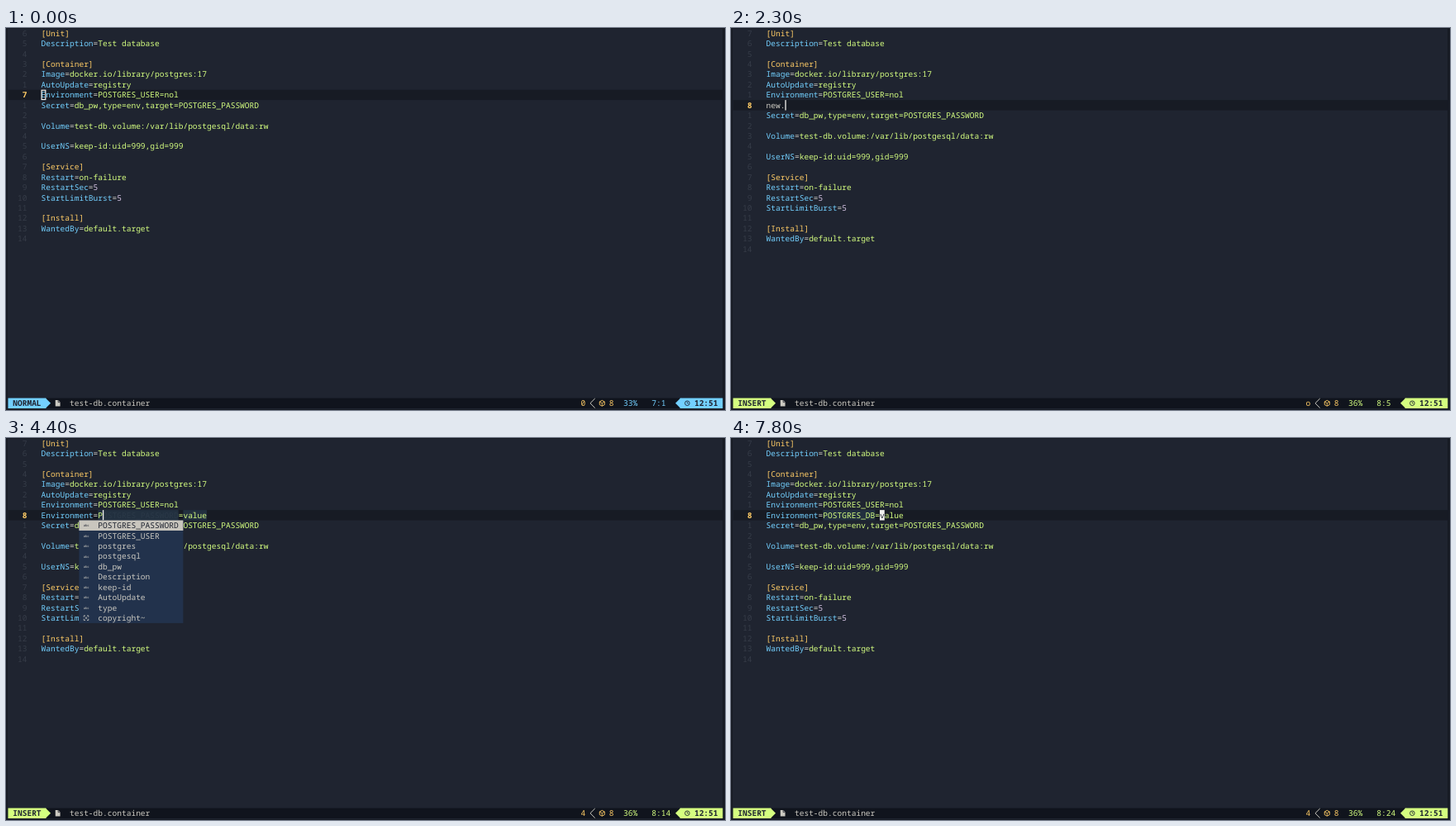
These frames come from a looping animation (870 by 462 pixels, 8 s). An HTML page with a canvas:

```html
<!DOCTYPE html>
<html lang="en">
<head>
<meta charset="utf-8">
<title>Editor session</title>
<style>
html, body { margin: 0; width: 100%; height: 100%; overflow: hidden; background: #1f2430; }
canvas { display: block; }
</style>
</head>
<body>
<canvas id="stage" width="870" height="462"></canvas>
<script>
const ctx = document.getElementById('stage').getContext('2d');
ctx.textRendering = 'geometricPrecision';
const LOOP = 8000, CELL = 5.727, LINE = 12.43, LEFT = 2.5, TOP = 0.1, BASE = 9.6, COLS = 151;
const TEXT_COL = 7, EDIT_ROW = 7, STATUS_ROW = 36;
const FONT = '9.545px "Noto Sans Mono", "DejaVu Sans Mono", monospace';
const C = {
  bg: '#1f2430', edge: '#171b24', line: '#171b24', bar: '#10141d', fg: '#cccac2',
  dim: '#363c48', yellow: '#ffcc66', blue: '#73d0ff', green: '#d5ff80', num: '#d6c4e4',
  orange: '#ffad66', menu: '#22324c', pick: '#c9c6be', thumb: '#586270', slot: '#22303f',
  slotGhost: '#2b3948', select: '#33486a', cursor: '#f2f2f0'
};
const MODES = { NORMAL: C.blue, INSERT: C.green, SELECT: C.orange };

const FILE = `[Unit]
Description=Test database

[Container]
Image=docker.io/library/postgres:17
AutoUpdate=registry
Environment=POSTGRES_USER=nol
Secret=db_pw,type=env,target=POSTGRES_PASSWORD

Volume=test-db.volume:/var/lib/postgesql/data:rw

UserNS=keep-id:uid=999,gid=999

[Service]
Restart=on-failure
RestartSec=5
StartLimitBurst=5

[Install]
WantedBy=default.target
`.split('\n');

// Completion menus: first column, width in cells, entries
const menu = (col, width, list, scroll) => ({ col, width, items: list.split(' '), scroll });
const wordMenu = list => menu(15, 22, list);
const OPTIONS = menu(3, 28, 'Network= NetworkAlias= NoNewPrivileges= Notify= Environment= UserNS= ' +
  'Annotation= ContainerName= ContainersConfModule= DNSOption=', true);
const OPTIONS_NE = menu(3, 22, 'Network= NetworkAlias= NoNewPrivileges= Environment= ContainerName=');
const OPTIONS_NEW = menu(3, 22, 'NoNewPrivileges=');
const SNIPPETS = menu(7, 21, 'new.Environment~ new.Volume~ dateDMY~ dateMDY~ timeHMS~ datetime~');
const WORDS = wordMenu('POSTGRES_PASSWORD POSTGRES_USER postgres postgesql db_pw Description ' +
  'keep-id AutoUpdate type copyright~');
const WORDS_PO = wordMenu('POSTGRES_PASSWORD POSTGRES_USER postgres postgesql');
const WORDS_ENV = wordMenu('POSTGRES_PASSWORD POSTGRES_USER');
const WORD_LAST = wordMenu('POSTGRES_PASSWORD');

// Each step overrides part of the state before it
const STEPS = [
  [0, { mode: 'NORMAL', key: '0', pct: '33%', pos: '7:1', open: false, cursor: 'box' }],
  [100, { cursor: 'block' }],
  [1300, { open: true, cursor: 'bar', typed: '', ghost: '' }],
  [1900, { mode: 'INSERT', key: 'o', pct: '36%', pos: '8:2', typed: 'n', ghost: 'etwork=', menu: OPTIONS }],
  [2000, { typed: 'ne', ghost: 'twork=', pos: '8:3', menu: OPTIONS_NE }],
  [2200, { typed: 'new', ghost: '', pos: '8:4', menu: OPTIONS_NEW }],
  [2300, { typed: 'new.', pos: '8:5', menu: null }],
  [2700, { typed: 'new.E', ghost: 'onment=name=value', pos: '8:6', menu: SNIPPETS }],
  [2900, { typed: 'new.En', ghost: 'nment=name=value' }],
  [3700, { snippet: true, typed: '', ghost: '', name: 'name', menu: null, cursor: 'block' }],
  [3800, { mode: 'SELECT', key: '4', pos: '8:13' }],
  [4200, { name: '', typed: 'P', cursor: 'bar' }],
  [4300, { mode: 'INSERT', pos: '8:14', menu: WORDS }],
  [4500, { typed: 'PO', pos: '8:15', menu: WORDS_PO }],
  [4600, { typed: 'POS', pos: '8:16' }],
  [4700, { typed: 'POST', pos: '8:17' }],
  [4800, { typed: 'POSTG', pos: '8:18' }],
  [5900, { typed: 'POSTGR' }],
  [6000, { typed: 'POSTGRE', pos: '8:19' }],
  [6100, { typed: 'POSTGRES', pos: '8:20' }],
  [6300, { typed: 'POSTGRES_', pos: '8:21', menu: WORDS_ENV }],
  [6400, { typed: 'POSTGRES_D', pos: '8:22', menu: WORD_LAST }],
  [6500, { typed: 'POSTGRES_DB', pos: '8:23', menu: null }],
  [7800, { pos: '8:24', jumped: true, cursor: 'block' }]
];

const x = col => LEFT + col * CELL;
const y = row => TOP + row * LINE;

function cells(col, row, width, color, rows = 1) {
  ctx.fillStyle = color;
  ctx.fillRect(x(col), y(row), width * CELL, rows * LINE);
}

function text(str, col, row, color, bold) {
  ctx.font = (bold ? 'bold ' : '') + FONT;
  ctx.fillStyle = color;
  [...str].forEach((ch, i) => ctx.fillText(ch, x(col + i), y(row) + BASE));
  return col + str.length;
}

function path(points, color, stroke) {
  ctx.beginPath();
  points.forEach(([px, py]) => ctx.lineTo(px, py));
  if (stroke) {
    ctx.strokeStyle = color;
    ctx.lineWidth = stroke;
    ctx.stroke();
  } else {
    ctx.fillStyle = color;
    ctx.fill();
  }
}

function codeLine(str, row) {
  if (str[0] === '[') return text(str, TEXT_COL, row, C.yellow);
  const cut = str.indexOf('=');
  if (cut < 0) return;
  const value = str.slice(cut + 1);
  let col = text(str.slice(0, cut), TEXT_COL, row, C.blue);
  col = text('=', col, row, C.fg);
  text(value, col, row, /^\d+$/.test(value) ? C.num : C.green);
}

function cursor(kind, col, row, ch) {
  if (kind === 'bar') {
    ctx.fillStyle = C.cursor;
    ctx.fillRect(x(col) - 0.1, y(row), 1.3, LINE);
  } else if (kind === 'box') {
    ctx.strokeStyle = C.cursor;
    ctx.lineWidth = 1.2;
    ctx.strokeRect(x(col) + 0.5, y(row) + 0.6, CELL - 1, LINE - 1.2);
  } else {
    cells(col, row, 1, C.cursor);
    text(ch, col, row, C.bg);
  }
}

function editLine(s) {
  const row = EDIT_ROW;
  if (!s.snippet) {
    const end = text(s.typed, TEXT_COL, row, C.fg);
    text(s.ghost, end, row, C.dim);
    return cursor(s.cursor, end, row, '');
  }
  const start = text('=', text('Environment', TEXT_COL, row, C.blue), row, C.fg);
  const word = s.name || s.typed;
  const full = 'POSTGRES_PASSWORD';
  const ghost = s.menu && full.startsWith(s.typed) ? full.slice(s.typed.length) : '';
  const end = start + word.length + ghost.length;
  cells(start, row, end - start, s.name ? C.select : C.slot);
  if (!s.jumped) cells(end + 1, row, 5, C.slot);
  text(ghost, text(word, start, row, C.green), row, C.slotGhost);
  text('=value', end, row, C.green);
  if (s.jumped) cursor('block', end + 1, row, 'v');
  else if (s.name) cursor('block', start, row, 'n');
  else cursor('bar', start + word.length, row);
}

function itemIcon(label, cx, cy, color) {
  const at = pts => pts.map(([a, b]) => [cx + a, cy + b]);
  if (label.endsWith('=')) {
    path(at([[-2.8, -2.6], [0, -2.6], [2.8, 0.2], [0.3, 2.7], [-2.8, -0.3]]), color);
  } else if (label.endsWith('~')) {
    for (const sx of [-1, 1]) for (const sy of [-1, 1])
      path(at([[sx * 2.8, sy], [sx * 2.8, sy * 2.8], [sx, sy * 2.8]]), color, 0.8);
    path(at([[-1.2, -1.2], [1.2, 1.2]]), color, 0.8);
    path(at([[-1.2, 1.2], [1.2, -1.2]]), color, 0.8);
  } else {
    ctx.font = '4px "Noto Sans", sans-serif';
    ctx.fillStyle = color;
    ctx.textAlign = 'center';
    ctx.fillText('abc', cx, cy + 1.6);
    ctx.textAlign = 'left';
  }
}

function drawMenu({ col, width, items, scroll }) {
  const top = EDIT_ROW + 1;
  cells(col, top, width, C.menu, items.length);
  cells(col, top, width - (scroll ? 1 : 0), C.pick);
  if (scroll) cells(col + width - 1, top, 1, C.thumb, 2);
  items.forEach((label, i) => {
    const color = i ? C.fg : C.bg;
    itemIcon(label, x(col + 1.5), y(top + i) + LINE / 2, color);
    text(label, col + 4, top + i, color);
  });
}

function statusBar(s) {
  const row = STATUS_ROW, accent = MODES[s.mode];
  const t = y(row), b = y(row + 1), mid = (t + b) / 2;
  cells(0, row, COLS, C.bar);
  cells(0, row, 8, accent);
  path([[x(8) - 0.5, t], [x(9), mid], [x(8) - 0.5, b]], accent);
  text(s.mode, 1, row, C.bg, true);

  const fx = x(10);
  path([[fx, mid - 3.8], [fx + 3.4, mid - 3.8], [fx + 5.8, mid - 1.2], [fx + 5.8, mid + 3.8], [fx, mid + 3.8]], C.fg);
  path([[fx + 3.4, mid - 3.8], [fx + 3.4, mid - 1.2], [fx + 5.8, mid - 1.2]], C.bar, 0.7);
  text('test-db.container', 13, row, C.fg);

  text(s.key, 121, row, C.yellow);
  path([[x(124), t + 0.5], [x(123), mid], [x(124), b - 0.5]], C.fg, 1);
  const px = x(125.5);
  path([[px, mid - 3.4], [px + 3, mid - 1.8], [px + 3, mid + 1.8], [px, mid + 3.4],
    [px - 3, mid + 1.8], [px - 3, mid - 1.8], [px, mid - 3.4]], C.yellow, 0.9);
  path([[px - 3, mid - 1.8], [px, mid], [px + 3, mid - 1.8]], C.yellow, 0.8);
  path([[px, mid], [px, mid + 3.4]], C.yellow, 0.8);
  text('8', 127, row, C.yellow);
  text(s.pct, 130, row, accent);
  text(s.pos, 136, row, accent);

  cells(142, row, 9, accent);
  path([[x(142) + 0.5, t], [x(141), mid], [x(142) + 0.5, b]], accent);
  const cx = x(143.5);
  ctx.beginPath();
  ctx.arc(cx, mid, 2.8, 0, Math.PI * 2);
  ctx.strokeStyle = C.bg;
  ctx.lineWidth = 0.9;
  ctx.stroke();
  path([[cx, mid - 1.7], [cx, mid + 0.2], [cx + 1.3, mid + 0.2]], C.bg, 0.8);
  text('12:51', 145, row, C.bg, true);
}

function draw(s) {
  ctx.fillStyle = C.edge;
  ctx.fillRect(0, 0, 870, 462);
  ctx.fillStyle = C.bg;
  ctx.fillRect(2, 1, 865, 460);

  const current = s.open ? EDIT_ROW : EDIT_ROW - 1;
  const lines = s.open ? [...FILE.slice(0, EDIT_ROW), '', ...FILE.slice(EDIT_ROW)] : FILE;
  cells(0, current, COLS, C.line);
  lines.forEach((str, row) => {
    const here = row === current;
    const num = String(here ? row + 1 : Math.abs(row - current));
    text(num, 4 - num.length, row, here ? C.yellow : C.dim, here);
    codeLine(str, row);
  });
  if (s.open) editLine(s);
  else cursor(s.cursor, TEXT_COL, current, 'E');
  if (s.menu) drawMenu(s.menu);
  statusBar(s);
}

const stateAt = t => Object.assign({}, ...STEPS.filter(([at]) => at <= t).map(([, s]) => s));

const begin = performance.now();
function tick() {
  draw(stateAt((performance.now() - begin) % LOOP));
  requestAnimationFrame(tick);
}
tick();
</script>
</body>
</html>
```
